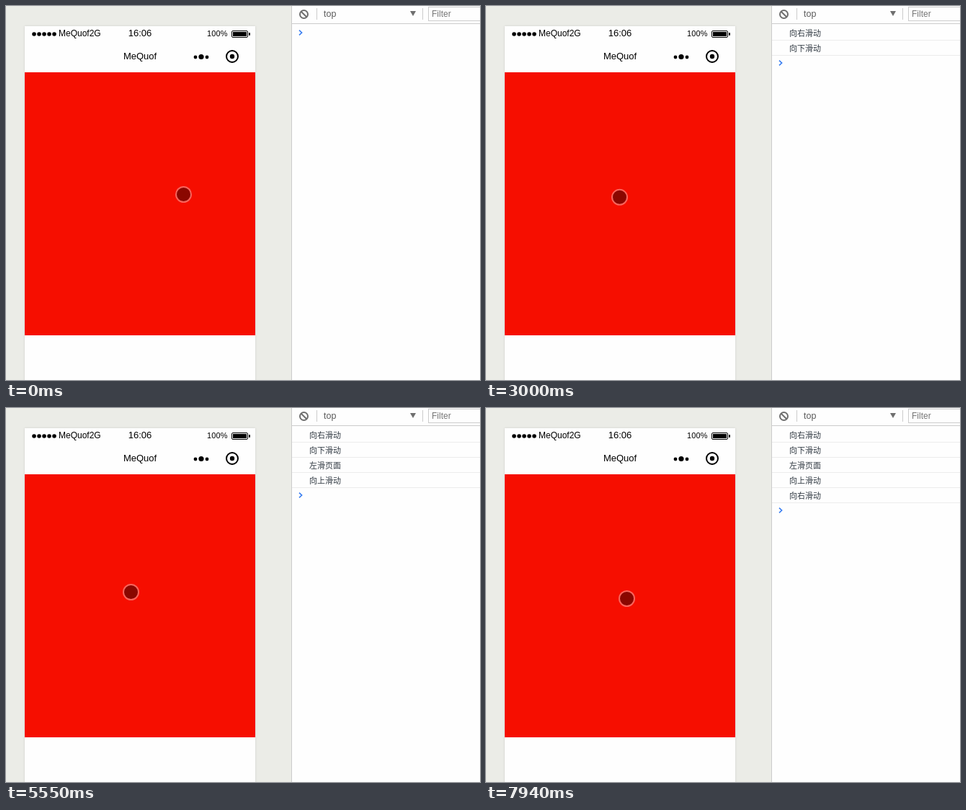
These frames come from a looping animation (658x519 px, 8000 ms). An HTML page:

```html
<!DOCTYPE html>
<html lang="zh">
<head>
<meta charset="utf-8">
<style>
  html, body { margin: 0; width: 100%; height: 100%; overflow: hidden; background: #ebece7; }
  svg { display: block; font-family: "Liberation Sans", Arial, sans-serif; }
  .phone { filter: drop-shadow(0 0 1.5px rgba(0, 0, 0, .12)); }
  .log { font: 11px "Noto Sans CJK SC", "Noto Sans CJK", sans-serif; fill: #303942; }
  .tools { fill: #5a5a5a; font-size: 12px; }
</style>
</head>
<body>
<svg width="658" height="519" viewBox="0 0 658 519">
  <rect class="phone" x="26" y="28" width="320" height="500" fill="#fefefe"/>
  <rect x="26" y="92" width="320" height="365" fill="#f60e00"/>

  <!-- Status bar -->
  <g id="signal"></g>
  <text x="73" y="42" font-size="12">MeQuof2G</text>
  <text x="186" y="42" font-size="13" text-anchor="middle">16:06</text>
  <text x="279" y="42" font-size="11" letter-spacing=".1">100%</text>
  <rect x="313.5" y="34.5" width="22" height="9" rx="1.5" fill="none" stroke="#000"/>
  <rect x="315" y="36" width="19" height="6"/>
  <rect x="337" y="37" width="2" height="4" rx="1"/>

  <!-- Title bar -->
  <text x="186" y="74" font-size="13" text-anchor="middle">MeQuof</text>
  <circle cx="263" cy="71" r="2.4"/>
  <circle cx="271" cy="70.5" r="3.6"/>
  <circle cx="279" cy="71" r="2.4"/>
  <circle cx="314" cy="70" r="8" fill="none" stroke="#000" stroke-width="2"/>
  <circle cx="314" cy="70" r="3.2"/>

  <!-- Console -->
  <rect x="397" width="261" height="519" fill="#fefefe"/>
  <path d="M396.5 0V519M397 24.5H658M431.5 3V19M578.5 3V19" stroke="#ccc"/>
  <g fill="none" stroke="#6e6e6e" stroke-width="2">
    <circle cx="413.5" cy="11.5" r="5.5"/>
    <path d="M409.5 7.5l8 8"/>
  </g>
  <text class="tools" x="441" y="15" style="font-size:12.5px">top</text>
  <path d="M561 7h8l-4 7z" fill="#6e6e6e"/>
  <rect x="586.5" y="1.5" width="90" height="19" fill="#fefefe" stroke="#ccc"/>
  <text class="tools" x="591" y="15" style="fill:#777">Filter</text>
  <g id="logs"></g>
  <path id="prompt" d="M407 33.7l3.6 3.3l-3.6 3.3" fill="none" stroke="#367cf1" stroke-width="1.6"/>

  <circle id="touch" r="10.5" fill="#8a0700" stroke="#f7655c" stroke-width="2"/>
</svg>
<script>
const LOOP = 8000, STEP = 150, SWIPE = 3 * STEP, ROW = 21;
const $ = id => document.getElementById(id);

// Each swipe is logged when it ends; the finger may then rest before moving on.
const swipes = [
  { end: 900, from: [116.5, 264], to: [268, 262], text: "向右滑动" },
  { end: 1950, from: [186, 208], to: [175.5, 303.5], text: "向下滑动", rest: 2 * STEP },
  { end: 3150, from: [283.5, 264], to: [136.5, 266], text: "左滑页面" },
  { end: 4350, from: [180, 321.5], to: [201.5, 220.5], text: "向上滑动", rest: 5 * STEP },
  { end: 6900, from: [188.5, 258.5], to: [275.5, 223.5], text: "向右滑动" }
];

// Places the finger passes between swipes
const hovers = [
  { at: 0, point: [246.5, 261.5] },
  { at: 1050, point: [244.5, 267.5] },
  { at: 5550, point: [173.5, 255.5] },
  { at: 6000, point: [230.5, 215.5] },
  { at: 7940, point: [195.5, 264.5] }
];

const stops = [
  ...hovers,
  ...swipes.flatMap(({ end, from, to, rest = 0 }) => [
    { at: end - SWIPE, point: from, linear: true },
    { at: end, point: to },
    { at: end + rest, point: to }
  ])
].sort((a, b) => a.at - b.at);

$("signal").innerHTML = [0, 1, 2, 3, 4]
  .map(i => `<circle cx="${39 + 7 * i}" cy="39" r="2.8"/>`).join("");

$("logs").innerHTML = swipes.map(({ text }, i) => `<g>
  <text class="log" x="421" y="${42 + ROW * i}">${text}</text>
  <path d="M397 ${47.5 + ROW * i}H658" stroke="#ececec"/></g>`).join("");

function touchAt(time) {
  const next = stops.findIndex(stop => stop.at > time);
  if (next < 0) return stops[stops.length - 1].point;
  const a = stops[next - 1], b = stops[next];
  const part = (time - a.at) / (b.at - a.at);
  const eased = a.linear ? part : (1 - Math.cos(Math.PI * part)) / 2;
  return a.point.map((value, axis) => value + (b.point[axis] - value) * eased);
}

// Steps run back from the loop's last position, or forward from its start.
function snap(time) {
  const last = stops[stops.length - 1].at;
  const shift = time < last - 4 * STEP ? 0 : last % STEP;
  return Math.floor((time - shift) / STEP) * STEP + shift;
}

function draw(now) {
  const time = snap(now % LOOP);
  const [x, y] = touchAt(time);
  $("touch").setAttribute("transform", `translate(${x} ${y})`);

  const count = swipes.filter(({ end }) => end <= time).length;
  [...$("logs").children].forEach((row, i) => row.setAttribute("visibility", i < count ? "visible" : "hidden"));
  $("prompt").setAttribute("transform", `translate(0 ${ROW * count})`);
}

const begin = performance.now();
function tick() {
  draw(performance.now() - begin);
  requestAnimationFrame(tick);
}
tick();
</script>
</body>
</html>
```
